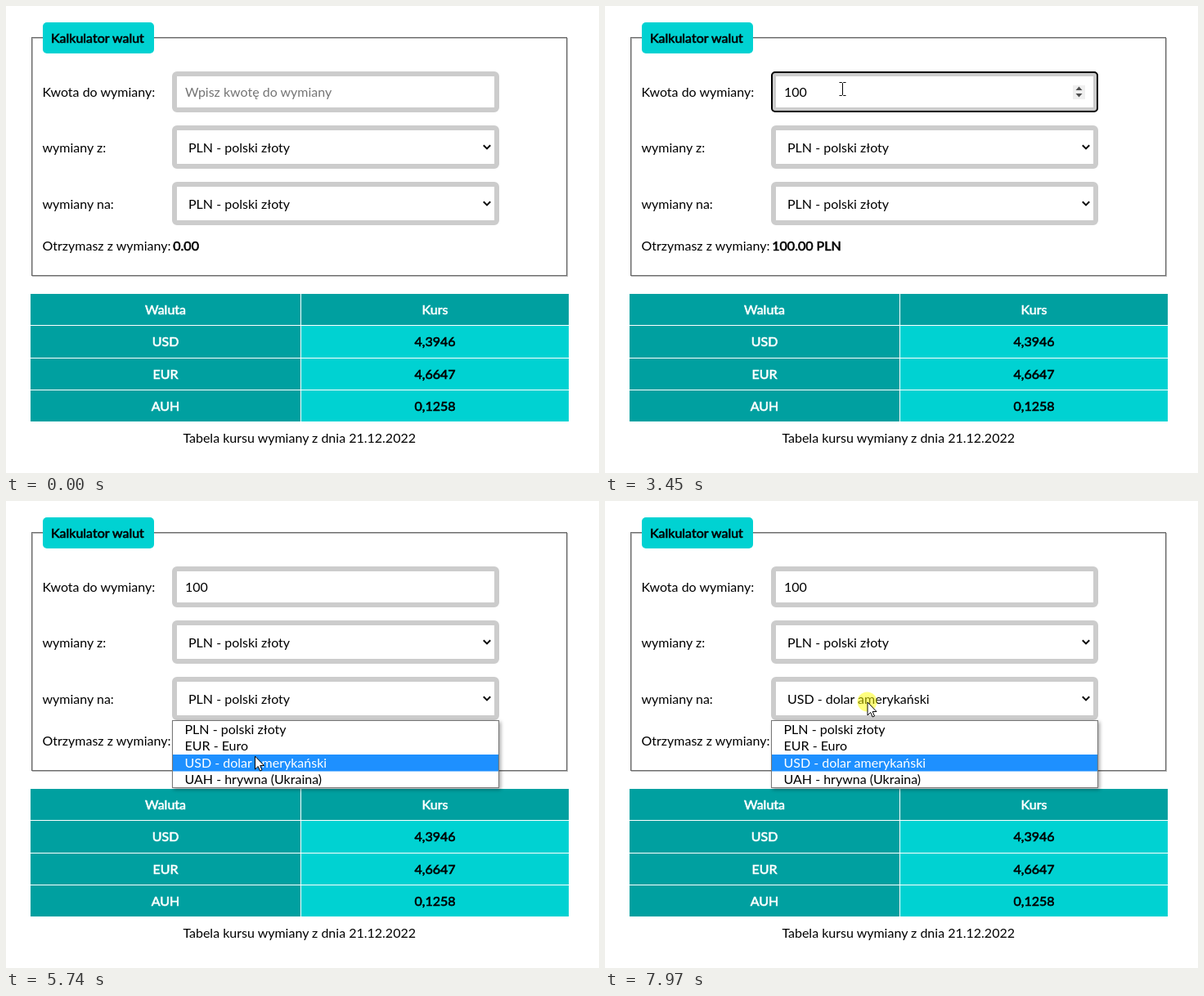
An HTML page for the animation above (8000 ms loop, 725x571 px).

```html
<!DOCTYPE html>
<html lang="pl">
<head>
<meta charset="utf-8">
<title>Kalkulator walut</title>
<style>
  html, body { margin: 0; width: 725px; height: 571px; overflow: hidden; background: #fff; }
  svg { display: block; font: 16px Lato, sans-serif; }
  .bold { stroke: currentColor; stroke-width: .6px; fill: currentColor; }
  .mid { text-anchor: middle; }
  .white { color: #fff; }
  .line { fill: none; stroke: #000; }
  #popup > rect:first-child { filter: drop-shadow(2px 2px 2px rgba(0, 0, 0, .35)); }
</style>
</head>
<body>
<svg id="stage" width="725" height="571" viewBox="0 0 725 571"></svg>
<script>
const LOOP = 8000;
const currencies = ['PLN - polski złoty', 'EUR - Euro', 'USD - dolar amerykański', 'UAH - hrywna (Ukraina)'];
const rates = [['Waluta', 'Kurs'], ['USD', '4,3946'], ['EUR', '4,6647'], ['AUH', '0,1258']];
const rowTops = [352, 391, 431, 470, 509];
const itemTop = i => Math.round(268.7 + 20.4 * i);

const rect = (x, y, w, h, attrs) => `<rect x="${x}" y="${y}" width="${w}" height="${h}" ${attrs}/>`;
const text = (x, y, str, attrs = '') => `<text x="${x}" y="${y}" ${attrs}>${str}</text>`;
const field = (y, h) => rect(206, y + 3, 394, h - 6, 'rx="3" fill="#fff" stroke="#ccc" stroke-width="6"');
const ring = (id, y, h) => rect(204, y + 1, 398, h - 2, `id="${id}" rx="4" class="line" stroke-width="2"`);
const chevron = y => `<path class="line" stroke-width="2" d="M583.8 ${y - 2}l4.2 4.2 4.2-4.2"/>`;

const table = rates.map(([name, rate], i) => {
  const y = rowTops[i], h = rowTops[i + 1] - y - 1;
  return rect(30, y, 330, h, 'fill="#00a0a0"') +
    rect(361, y, 327, h, `fill="${i ? '#00d2d2' : '#00a0a0'}"`) +
    text(195, y + 25, name, 'class="bold mid white"') +
    text(524.5, y + 25, rate, `class="bold mid ${i ? '' : 'white'}"`);
}).join('');

const popup = rect(203.5, 268.5, 399, 82, 'fill="#fff" stroke="#767676"') +
  rect(204, 269, 398, 20.5, 'id="highlight" fill="#1e90ff"') +
  currencies.map((name, i) => text(218.5, itemTop(i) + 16, name, 'class="item"')).join('');

document.getElementById('stage').innerHTML =
  rect(32.5, 39.5, 654, 291, 'fill="none" stroke="#b8b8b8"') +
  rect(31.5, 38.5, 654, 291, 'fill="none" stroke="#6b6b6b"') +
  rect(45, 20, 136, 38, 'rx="5" fill="#00d2d2"') +
  text(55, 45, 'Kalkulator walut', 'class="bold"') +
  text(44.5, 111, 'Kwota do wymiany:') + text(44.5, 179, 'wymiany z:') +
  text(44.5, 248, 'wymiany na:') + text(44.5, 299, 'Otrzymasz z wymiany:') +
  text(204.3, 299, '', 'id="result" class="bold"') +
  field(80, 50) + field(146, 53) + field(215, 53) +
  ring('inputRing', 80, 50) + ring('selectRing', 215, 53) +
  text(219, 111, '', 'id="amount"') + rect(219, 96, 1, 18, 'id="caret"') +
  `<g id="spinner">${rect(572, 97, 15, 17, 'fill="#efefef"')}
    <path fill="#505050" d="M575.5 103l4-4.5 4 4.5zM575.5 107l4 4.5 4-4.5z"/></g>` +
  text(223, 179, currencies[0]) + chevron(172.2) +
  text(223, 248, '', 'id="target"') + chevron(241.2) +
  table + text(358.7, 534, 'Tabela kursu wymiany z dnia 21.12.2022', 'class="mid"') +
  `<g id="popup">${popup}</g>
  <g id="cursor">
    <circle id="click" r="12" fill="#ff0" fill-opacity=".5"/>
    <path id="arrow" fill="#fff" stroke="#000" d="M.5.5V16.5L4.2 13 6.6 18.5 9 17.5 6.7 12H11.5Z"/>
    <path id="beam" class="line" d="M-4-8h3l1 1 1-1h3M0-7V7M-4 8h3l1-1 1 1h3"/>
  </g>`;

const el = {};
document.querySelectorAll('[id]').forEach(node => el[node.id] = node);
const items = document.querySelectorAll('.item');
const show = (node, on) => node.style.display = on ? '' : 'none';

// Pointer stops: time, x, y
const stops = [
  [470, 108, -12], [980, 283, 100], [2200, 283, 100], [2370, 290.5, 101.5],
  [3720, 290.5, 101.5], [4250, 296, 238], [5179, 296, 238], [5180, 297, 238],
  [5330, 297, 238], [5530, 297.5, 283], [5880, 305, 317], [6500, 305, 317],
  [6830, 294, 309], [7310, 294, 309], [7710, 320.5, 245.5]
];
const clicks = [[1180, 1310], [4520, 4650], [6080, 6220], [7970, LOOP]];
const caretTimes = [[1240, 1770], [2300, 3450], [3980, 4510]];
const popupTimes = [[4580, 6220], [7970, LOOP]];
const during = (spans, t) => spans.some(([a, b]) => t >= a && t < b);

function pointerAt(t) {
  const next = stops.findIndex(s => s[0] > t);
  if (next < 0) return stops[stops.length - 1].slice(1);
  if (!next) return stops[0].slice(1);
  const [t0, x0, y0] = stops[next - 1], [t1, x1, y1] = stops[next];
  const k = 1 - (1 - (t - t0) / (t1 - t0)) ** 2;
  return [x0 + (x1 - x0) * k, y0 + (y1 - y0) * k];
}

function draw(t) {
  const [x, y] = pointerAt(t);
  const typed = t < 2300 ? '' : t < 2770 ? '1' : t < 2900 ? '10' : '100';
  const selected = t < 6220 ? 0 : 2;
  const open = during(popupTimes, t);
  const overInput = x > 203 && x < 603 && y > 80 && y < 130;
  const focused = t >= 1240 && t < 4580;

  el.amount.textContent = typed || 'Wpisz kwotę do wymiany';
  el.amount.setAttribute('fill', typed ? '#000' : '#757575');
  el.result.textContent = !typed ? '0.00' : selected ? '22.75 USD' : typed + '.00 PLN';
  el.target.textContent = currencies[selected];
  el.caret.setAttribute('x', Math.floor(219 + 9.28 * typed.length));
  show(el.caret, during(caretTimes, t));
  show(el.inputRing, focused);
  show(el.spinner, focused || overInput);
  show(el.selectRing, selected && !open);

  show(el.popup, open);
  const hovered = y < 269 ? selected : Math.min(3, Math.floor((y - 269) / 20.4));
  el.highlight.setAttribute('y', itemTop(hovered));
  items.forEach((item, i) => item.setAttribute('fill', i === hovered ? '#fff' : '#000'));

  show(el.cursor, t >= 500);
  el.cursor.setAttribute('transform', `translate(${Math.round(x * 2) / 2} ${Math.round(y * 2) / 2})`);
  show(el.click, during(clicks, t));
  show(el.beam, overInput);
  show(el.arrow, !overInput);
}

const start = performance.now();
function tick() {
  draw((performance.now() - start) % LOOP);
  requestAnimationFrame(tick);
}
tick();
</script>
</body>
</html>
```
